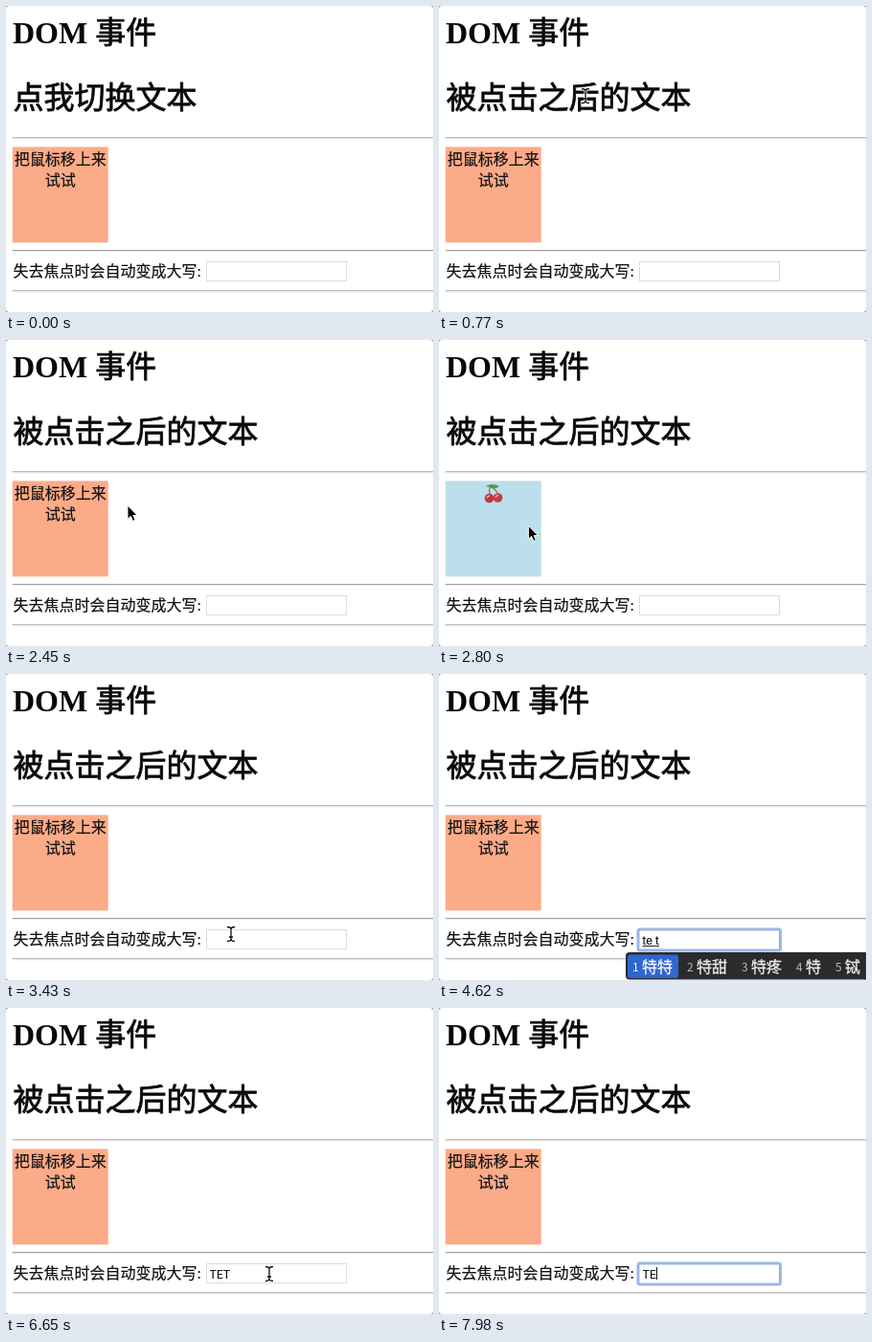
An HTML page for the animation above (8000 ms loop, 446x320 px).

```html
<!DOCTYPE html>
<html lang="zh-CN">
<meta charset="utf-8">
<title>DOM 事件</title>
<style>
  html, body { margin: 0; height: 100%; overflow: hidden; background: #fff }
  svg { display: block; width: 446px; height: 320px }
  text { font: 16px 'Liberation Serif', 'Noto Sans CJK SC', serif; fill: #111; stroke: #111; stroke-width: .2px; white-space: pre }
  .h1 { font-size: 32px; fill: #080808; stroke-width: .8px }
  .latin { font-weight: 700; stroke: none }
  .mid { text-anchor: middle }
  #value { font: 11.5px Inter, sans-serif }
  #popup text { font: 16px 'Noto Sans CJK SC', sans-serif; fill: #eee; stroke: #eee; stroke-width: .3px }
  #popup .num { font-size: 12px; fill: #bbb; stroke: none }
  #popup .on { fill: #fff }
</style>
<svg viewBox="0 0 446 320">
  <rect width="446" height="320" fill="#888"/>
  <rect width="446" height="320" rx="3" fill="#fff"/>
  <text class="h1" x="7" y="39"><tspan class="latin">DOM </tspan>事件</text>
  <text class="h1" x="7.5" y="107" id="heading"></text>
  <g id="rules"></g>
  <rect id="box" x="6.7" y="147.4" width="100" height="100"/>
  <g id="hint">
    <text class="mid" x="56.7" y="166">把鼠标移上来</text>
    <text class="mid" x="56.7" y="188">试试</text>
  </g>
  <g id="cherry">
    <path d="M53 162Q52 156 54 153Q59 156 62 161" fill="none" stroke="#6b8436" stroke-width="1.2"/>
    <path d="M49 153Q55 149 63 153Q58 157 53 154Z" fill="#5a9247"/>
    <circle cx="52.5" cy="165.5" r="4.8" fill="#c03440"/>
    <circle cx="61.5" cy="165" r="4.8" fill="#c83a46"/>
    <path d="M50 165q1-2 3-2M59 164.500q1-2 3-2" fill="none" stroke="#f0b0b0" stroke-width="1.6"/>
  </g>
  <text x="7.5" y="283">失去焦点时会自动变成大写:</text>
  <rect x="209.500" y="267.5" width="146" height="20" fill="#fff" stroke="#dcdcdc"/>
  <rect id="ring" x="208" y="267" width="148.5" height="22" rx="2" fill="#fff" stroke="#9bb6e6" stroke-width="3"/>
  <text id="value" x="212.5" y="282.7"></text>
  <path id="underline" stroke="#222"/>
  <path id="caret" stroke="#111"/>
  <g id="popup">
    <rect x="195" y="291" width="260" height="28.5" rx="4" fill="#2b2b2d"/>
    <rect x="197" y="293.5" width="53" height="24.5" rx="3" fill="#2f66d0"/>
  </g>
  <path id="arrow" d="M0 0V14.4L3.3 11.3L5.6 16.4L8 15.3L5.9 10.5H10.2Z" fill="#000" stroke="#fff"/>
  <g id="beam" fill="none">
    <path d="M-4-7.5Q0-7.5 0-5Q0-7.5 4-7.5M0-5V5M-4 7.5Q0 7.5 0 5Q0 7.5 4 7.5M-2 3H2" stroke="#fff" stroke-width="3"/>
    <path d="M-4-7.5Q0-7.5 0-5Q0-7.5 4-7.5M0-5V5M-4 7.5Q0 7.5 0 5Q0 7.5 4 7.5M-2 3H2" stroke="#111" stroke-width="1.3"/>
  </g>
</svg>
<script>
const LOOP = 8000, STEP = 70;
const el = id => document.getElementById(id);
const show = (id, on) => el(id).setAttribute('visibility', on ? 'visible' : 'hidden');
const within = (v, from, to) => v >= from && v < to;

el('rules').innerHTML = [137.3, 255, 297.3].map(y =>
  `<path d="M6.7 ${y + .5}H446" stroke="#a2a2a2"/><path d="M6.7 ${y + 1.5}H446" stroke="#e6e6e6"/>`).join('');
el('popup').innerHTML += [['特特', 202], ['特甜', 259], ['特疼', 316], ['特', 373], ['铽', 414]].map(([word, x], i) =>
  `<text class="num${i ? '' : ' on'}" x="${x}" y="311">${i + 1}</text><text${i ? '' : ' class="on"'} x="${x + 10}" y="311.5">${word}</text>`).join('');

// Pointer positions: time, x, y
const path = [
  [70, 298, 268], [420, 18, 26], [630, 153, 94], [1330, 153, 94], [1610, 101, 176],
  [1960, 60, 203], [2030, 60, 203], [2170, 122, 190], [2310, 186, 184], [2450, 127, 173],
  [2660, 70, 185], [2730, 70, 185], [2940, 140, 212], [3290, 228, 268], [3430, 235, 272],
  [5250, 235, 272], [5460, 285, 150], [5530, 292, 170], [5670, 291, 172],
  [6160, 291, 172], [6650, 275, 278], [8000, 275, 278]
];
const typed = [[0, ''], [3710, 't'], [3850, 'te'], [4060, 'te t'], [4830, 'tet'], [5670, 'TET'], [7910, 'TE']];

function pointerAt(t) {
  const i = Math.max(1, path.findIndex(p => p[0] >= t));
  const [t0, x0, y0] = path[i - 1], [t1, x1, y1] = path[i];
  const k = Math.max(0, (t - t0) / (t1 - t0));
  return [x0 + (x1 - x0) * k, y0 + (y1 - y0) * k];
}

function draw(t) {
  const clicked = t >= 770;
  el('heading').textContent = clicked ? '被点击之后的文本' : '点我切换文本';

  const [x, y] = pointerAt(t);
  const visible = within(t, 70, 3710) || within(t, 5320, 7910);
  const hover = visible && within(x, 7, 107) && within(y, 147, 247);
  el('box').setAttribute('fill', hover ? '#bddeec' : '#fcab88');
  show('cherry', hover);
  show('hint', !hover);

  const onText = within(x, 8, 156) && within(y, 12, 44)
    || within(x, 8, clicked ? 264 : 200) && within(y, 78, 112)
    || within(x, 8, 356) && within(y, 266, 289);
  for (const [id, on] of [['arrow', !onText], ['beam', onText]]) {
    show(id, visible && on);
    el(id).setAttribute('transform', `translate(${x} ${y})`);
  }

  const composing = within(t, 3710, 4830);
  const focused = within(t, 3570, 5670) || t >= 7350;
  el('value').textContent = typed.findLast(k => t >= k[0])[1];
  const end = 212.5 + el('value').getComputedTextLength();
  el('underline').setAttribute('d', `M212.5 284.5H${end}`);
  el('caret').setAttribute('d', `M${Math.round(end) + .5} 271V284`);
  show('underline', composing);
  show('ring', focused);
  show('caret', focused && !within(t, 4620, 4830));
  show('popup', within(t, 3780, 5040));
  el('popup').setAttribute('opacity', Math.min(1, (5040 - t) / 280));
}

function frame() {
  draw(Math.floor(performance.now() % LOOP / STEP) * STEP);
  requestAnimationFrame(frame);
}
frame();
</script>
</html>
```
